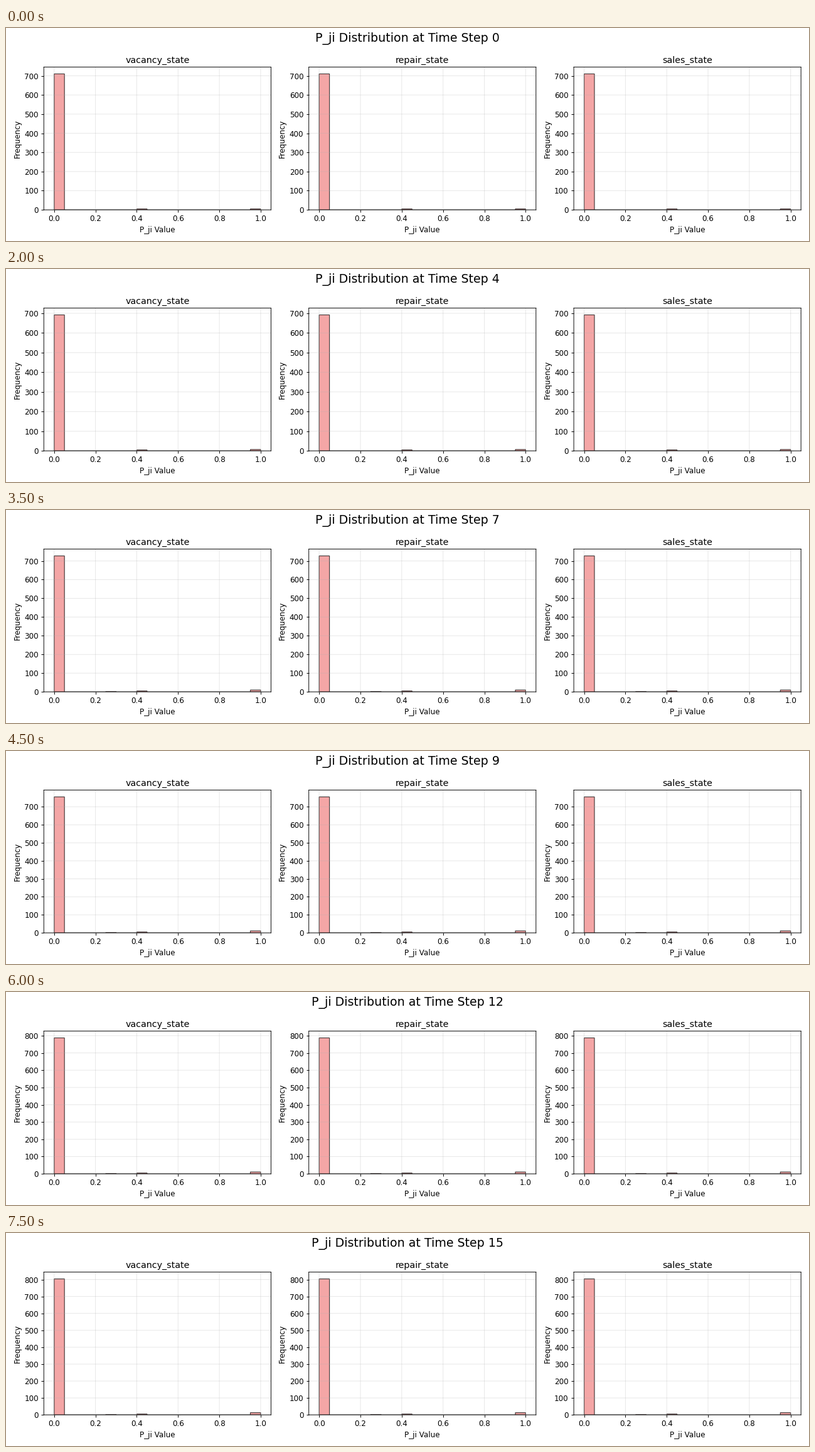
Write a matplotlib script that moves like this. It is 1280x341 px and loops after 8000 ms.

```python
import matplotlib.pyplot as plt
import numpy as np
from matplotlib.animation import FuncAnimation
from matplotlib.ticker import MultipleLocator

W, H, DPI = 1280, 341, 256 / 3
LAYOUT_DPI = 100
BINS = 20
STATES = ("vacancy_state", "repair_state", "sales_state")

# Bin counts per time step
ZEROS = (710, 684, 659, 676, 692, 708, 714, 727,
         740, 755, 768, 778, 787, 792, 798, 804)
ONES = (5, 5, 5, 6, 7, 8, 8, 10, 10, 11, 11, 11, 11, 12, 12, 13)
STEPS = len(ZEROS)

plt.rcParams["font.family"] = "DejaVu Sans"
plt.rcParams["path.snap"] = False  # keep lines at sub-pixel positions


def counts(step):
    heights = np.zeros(BINS)
    heights[0] = ZEROS[step]
    heights[5] = 2 if step >= 5 else 0
    heights[8] = 5
    heights[-1] = ONES[step]
    return heights


def make_panel(ax, name):
    bars = ax.bar(np.arange(BINS) / BINS, counts(0), width=1 / BINS, align="edge",
                  color="lightcoral", edgecolor="black", alpha=0.7)
    ax.set_title(name)
    ax.set_xlabel("P_ji Value")
    ax.set_ylabel("Frequency")
    ax.set_xlim(-0.05, 1.05)
    ax.xaxis.set_major_locator(MultipleLocator(0.2))
    ax.yaxis.set_major_locator(MultipleLocator(100))
    ax.grid(True, alpha=0.3)
    return bars


def update(step):
    heading.set_text(f"P_ji Distribution at Time Step {step}")
    heights = counts(step)
    for ax, bars in zip(axes, panels):
        for bar, height in zip(bars, heights):
            bar.set_height(height)
        ax.set_ylim(0, heights.max() * 1.05)
    return []


fig, axes = plt.subplots(1, 3, figsize=(W / DPI, H / DPI), dpi=DPI)
heading = fig.suptitle("", fontsize=16)
panels = [make_panel(ax, name) for ax, name in zip(axes, STATES)]

# Measure the text at a finer resolution, then return to the stage size
update(0)
fig.set_dpi(LAYOUT_DPI)
fig.tight_layout()
fig.set_dpi(DPI)

anim = FuncAnimation(fig, update, frames=STEPS, interval=500, repeat=True,
                     repeat_delay=0, blit=False)
plt.show()
```
